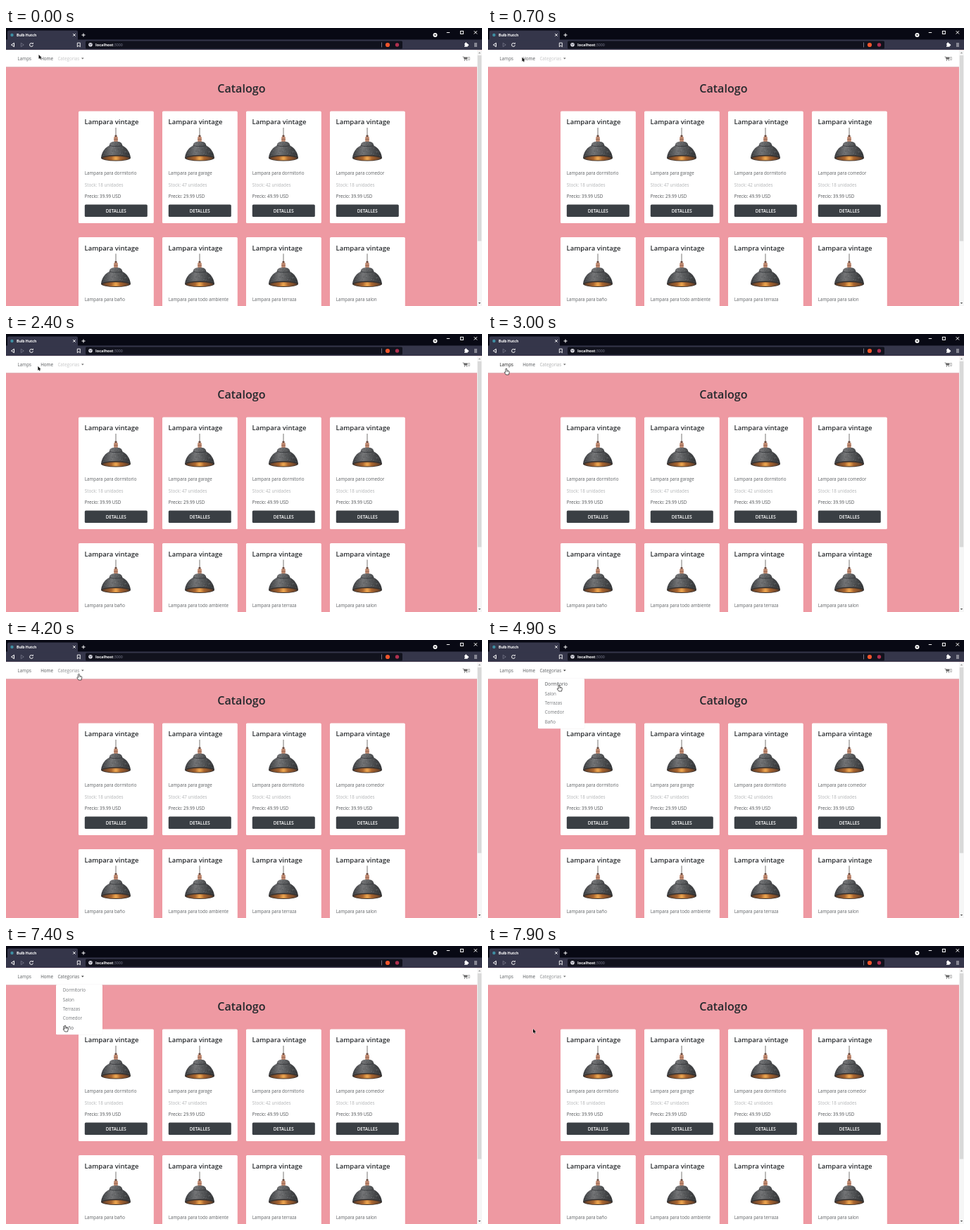
These frames come from a looping animation (676 px wide and 396 px high, 8 s). An HTML page with a canvas:

```html
<!DOCTYPE html>
<html lang="es">
<head>
<meta charset="utf-8">
<title>Bulb Hutch</title>
<style>
  html, body { margin: 0; width: 100%; height: 100%; overflow: hidden; background: #ee99a2; }
  canvas { display: block; width: 676px; height: 396px; }
</style>
</head>
<body>
<canvas id="stage"></canvas>
<script>
const W = 676, H = 396, LOOP = 8000;
const canvas = document.getElementById('stage');
const ratio = window.devicePixelRatio || 1;
canvas.width = W * ratio;
canvas.height = H * ratio;
const screen = canvas.getContext('2d');
let c = screen;

const FONT = '"Open Sans", "Noto Sans", sans-serif';
const BODY = 6.25;

const products = [
  ['Lampara vintage', 'dormitorio', 18, '39.99'],
  ['Lampara vintage', 'garage', 47, '29.99'],
  ['Lampara vintage', 'dormitorio', 42, '49.99'],
  ['Lampara vintage', 'comedor', 18, '39.99'],
  ['Lampara vintage', 'baño', 20, '29.99'],
  ['Lampara vintage', 'todo ambiente', 25, '39.99'],
  ['Lampra vintage', 'terraza', 30, '49.99'],
  ['Lampara vintage', 'salon', 15, '39.99']
];
const categories = ['Dormitorio', 'Salon', 'Terrazas', 'Comedor', 'Baño'];

// Pointer path: time, x, y
const path = [
  [0, 46.5, 38], [500, 46, 41], [1000, 52, 43], [1500, 78.5, 41.5], [1800, 82, 44],
  [2700, 27, 47], [3000, 26, 49], [3600, 25, 49], [3700, 57, 47], [3900, 57, 47],
  [4200, 103.5, 48], [4400, 103.5, 48], [4900, 101, 64], [5200, 101, 64],
  [5300, 101, 67], [6000, 101, 67], [6500, 88, 79.5], [7000, 87, 98],
  [7400, 84, 113], [7700, 58, 116], [7900, 64, 118]
];

function rect(x, y, w, h, fill, r = 0) {
  c.fillStyle = fill;
  c.beginPath();
  c.roundRect(x, y, w, h, r);
  c.fill();
}

function dot(x, y, r, fill) {
  c.fillStyle = fill;
  c.beginPath();
  c.arc(x, y, r, 0, Math.PI * 2);
  c.fill();
}

function trace(points) {
  c.beginPath();
  for (let i = 0; i < points.length; i += 2) c.lineTo(points[i], points[i + 1]);
}

function poly(points, fill) {
  trace(points);
  c.closePath();
  c.fillStyle = fill;
  c.fill();
}

function line(points, stroke, width = 0.8) {
  trace(points);
  c.strokeStyle = stroke;
  c.lineWidth = width;
  c.stroke();
}

function text(str, x, y, size, color, weight = 400, align = 'left') {
  c.font = `${weight} ${size}px ${FONT}`;
  c.textAlign = align;
  c.fillStyle = color;
  c.fillText(str, x, y);
}

function seeded(seed) {
  return () => (seed = (seed * 16807) % 2147483647) / 2147483647;
}

function browser() {
  rect(0, 0, W, 17, '#080914');
  rect(0, 16.5, W, 15, '#35364a');
  rect(2, 3.5, 100, 14, '#35364a', [2, 2, 0, 0]);
  dot(8.5, 10, 2.2, '#3f8fa3');
  text('Bulb Hutch', 15, 11.8, 5.1, '#fff', 700);
  line([95.2, 8.2, 98.6, 11.6], '#fff', 1);
  line([98.6, 8.2, 95.2, 11.6], '#fff', 1);
  line([107.5, 10, 112.5, 10], '#fff', 1);
  line([110, 7.5, 110, 12.5], '#fff', 1);

  dot(609.5, 10, 3, '#fff');
  poly([608, 9.3, 611, 9.3, 609.5, 11.4], '#111');
  line([625.8, 6.5, 630.2, 6.5], '#fff', 1);
  c.strokeRect(645.4, 4.4, 4, 4);
  line([664.7, 4.2, 669, 8.5], '#fff', 1);
  line([669, 4.2, 664.7, 8.5], '#fff', 1);

  line([11.5, 21.3, 7.5, 24, 11.5, 26.7, 11.5, 21.3], '#fff', 1);
  line([21.3, 21.3, 25.3, 24, 21.3, 26.7, 21.3, 21.3], '#77798a');
  c.beginPath();
  c.arc(36, 24, 2.4, 0.2, 5.4);
  c.strokeStyle = '#fff';
  c.lineWidth = 1;
  c.stroke();
  poly([36.5, 22.8, 38.8, 22.8, 38.8, 20.6], '#fff');
  line([101.3, 21.2, 105.3, 21.2, 105.3, 26.8, 103.3, 25, 101.3, 26.8, 101.3, 21.2], '#fff', 0.9);

  rect(113, 18.5, 450, 11, '#11121d', 1.5);
  dot(120, 23.8, 2.8, '#e4e4ea');
  line([118, 22.8, 120.3, 23.6, 119.6, 25.4], '#55566a', 0.8);
  line([120.7, 21.8, 122, 23.8], '#55566a', 0.7);
  text('localhost', 127, 25.9, 5.6, '#fff', 700);
  const end = 127 + c.measureText('localhost').width;
  text(':3000', end, 25.9, 5.2, '#85879a');
  rect(533, 20.5, 0.8, 7, '#8a8b9a');
  dot(542, 24, 3.1, '#f0552c');
  dot(555.5, 24, 2.7, '#b0304f');

  rect(651, 22, 4.7, 4.7, '#fff', 0.5);
  dot(653.2, 21.8, 1.2, '#fff');
  dot(655.9, 24.3, 1.2, '#fff');
  dot(651.1, 24.4, 0.8, '#35364a');
  for (let y = 22; y < 27; y += 2) line([665, y, 669, y], '#fff', 0.8);
}

function lamp(x, y) {
  c.save();
  c.translate(x, y);
  line([0, 0, 0, 11], '#55514f', 0.8);
  rect(-1.5, 10.5, 3, 4, '#6b4a3f', 0.8);
  rect(-2.8, 13, 5.6, 7.5, '#c08a70', 0.8);
  rect(-2.8, 16.3, 5.6, 0.8, '#8a5947');

  // Shade: a rounded cap that steps out into a wide bell
  c.beginPath();
  c.moveTo(-9.3, 25.5);
  c.bezierCurveTo(-9, 21, -6, 19.8, 0, 19.8);
  c.bezierCurveTo(6, 19.8, 9, 21, 9.3, 25.5);
  c.bezierCurveTo(15.5, 28.5, 20, 34.5, 21, 42.8);
  c.quadraticCurveTo(0, 51, -21, 42.8);
  c.bezierCurveTo(-20, 34.5, -15.5, 28.5, -9.3, 25.5);
  c.closePath();
  const metal = c.createLinearGradient(-21, 0, 21, 0);
  metal.addColorStop(0, '#37393c');
  metal.addColorStop(0.36, '#737476');
  metal.addColorStop(0.65, '#515355');
  metal.addColorStop(1, '#303234');
  c.fillStyle = metal;
  c.fill();
  c.save();
  c.clip();
  const rnd = seeded(71);
  for (let i = 0; i < 150; i++) {
    const shade = rnd() < 0.5 ? 'rgba(20,22,24,.35)' : 'rgba(170,172,174,.3)';
    rect(rnd() * 43 - 21.5, 20 + rnd() * 25, 0.9, 0.8, shade);
  }
  c.restore();
  line([-9.3, 25.5, -4, 26.5, 4, 26.5, 9.3, 25.5], '#303235', 0.7);

  c.beginPath();
  c.ellipse(0, 43.2, 21, 4.2, 0, 0, Math.PI * 2);
  c.fillStyle = '#37312e';
  c.fill();
  const glow = c.createRadialGradient(0, 44, 1, 0, 44, 19);
  glow.addColorStop(0, '#eaa44f');
  glow.addColorStop(0.3, '#a9652f');
  glow.addColorStop(1, '#5d3d2a');
  c.beginPath();
  c.ellipse(0, 43.6, 19, 3, 0, 0, Math.PI * 2);
  c.fillStyle = glow;
  c.fill();
  c.restore();
}

function card([name, room, stock, price], i) {
  c.save();
  c.translate(103 + (i % 4) * 119, 118.5 + Math.floor(i / 4) * 179.5);
  rect(0, 0, 106.8, 159.5, '#fff', 1.6);
  text(name, 8.6, 18.7, 9.5, '#25282b', 600);
  lamp(53, 23.5);
  text('Lampara para ' + room, 8.8, 90.6, BODY, '#5d6063');
  text(`Stock: ${stock} unidades`, 8.8, 107.2, BODY, '#b2b4b6');
  text(`Precio: ${price} USD`, 8.8, 123.9, BODY, '#4d5053');
  rect(8.8, 133, 89, 17.6, '#3a3f44', 1.6);
  text('DETALLES', 53.2, 144.2, BODY, '#fff', 600, 'center');
  c.restore();
}

function page() {
  rect(0, 31, W, H, '#ee99a2');
  rect(0, 55, 669, 1.2, '#dc9ea6');
  rect(0, 31.3, 669, 23.9, '#fff');
  text('Catalogo', 334.4, 91.8, 16.1, '#25292d', 600, 'center');
  products.forEach(card);

  line([648.5, 41, 650, 41, 651, 44.6, 655, 44.6], '#666', 0.7);
  poly([650, 41.4, 655.7, 41.4, 655, 43.9, 650.7, 43.9], '#666');
  dot(651.4, 46, 0.7, '#666');
  dot(654.5, 46, 0.7, '#666');
  text('0', 655.8, 45.8, BODY, '#777');

  rect(669, 31.3, 7, H, '#f6f6f6');
  rect(669.8, 39, 5.4, 264.5, '#d9d9d9');
  poly([670.8, 36.2, 674.2, 36.2, 672.5, 34.2], '#999');
  poly([670.8, 391, 674.2, 391, 672.5, 393], '#555');
}

// The unchanging part is drawn once.
const still = document.createElement('canvas');
still.width = canvas.width;
still.height = canvas.height;
c = still.getContext('2d');
c.scale(ratio, ratio);
browser();
page();
c = screen;
c.scale(ratio, ratio);

function pointerAt(t) {
  const n = path.findIndex(p => p[0] > t);
  if (n < 0) return path[path.length - 1].slice(1);
  const [t0, x0, y0] = path[n - 1], [t1, x1, y1] = path[n];
  const k = (t - t0) / (t1 - t0);
  return [x0 + (x1 - x0) * k, y0 + (y1 - y0) * k];
}

function nav(t, x, open) {
  const overBrand = t >= 2500 && x < 38 && t < 3700;
  text('Lamps', 16.6, 45.8, BODY, overBrand ? '#222' : '#606366');
  text('Home', 49.2, 45.8, BODY, '#505356');
  const tone = open ? '#606366' : t < 2500 ? '#c6c7c8' : t < 4000 ? '#b0b1b2' : '#8c8e90';
  text('Categorias', 73.4, 45.8, BODY, tone);
  poly([107, 42.6, 110.6, 42.6, 108.8, 44.5], open ? '#333' : '#666');
}

function menu(x, y) {
  rect(70.8, 54.8, 66.4, 71.7, 'rgba(90,60,65,.12)', 1.6);
  rect(71, 55, 66, 71.3, '#fff', 1.4);
  const active = x > 71 ? Math.floor((y - 56.3) / 13.4) : -1;
  categories.forEach((name, i) => {
    text(name, 80.8, 65.3 + i * 13.35, BODY, i === active ? '#505356' : '#75787b');
  });
}

function arrow(x, y) {
  c.save();
  c.translate(x, y);
  const shape = [0, 0, 0, 6, 1.4, 4.8, 2.3, 6.8, 3.3, 6.3, 2.4, 4.4, 4.2, 4.3];
  line([...shape, 0, 0], '#fff', 0.8);
  poly(shape, '#111');
  c.restore();
}

function hand(x, y) {
  c.save();
  c.translate(x, y);
  c.beginPath();
  c.moveTo(-1, 5.5);
  c.lineTo(-1, 0.8);
  c.quadraticCurveTo(0, -0.8, 0.9, 0.8);
  c.lineTo(0.9, 3.2);
  c.lineTo(3.5, 3.8);
  c.quadraticCurveTo(4.5, 4, 4.3, 5.5);
  c.lineTo(3.5, 9);
  c.lineTo(-0.5, 9);
  c.lineTo(-2.8, 5.7);
  c.quadraticCurveTo(-2.2, 4.4, -1, 5.5);
  c.closePath();
  c.fillStyle = '#fff';
  c.fill();
  c.strokeStyle = '#222';
  c.lineWidth = 0.75;
  c.stroke();
  line([0.9, 3.4, 0.9, 5.2], '#444', 0.5);
  line([2.3, 3.8, 2.3, 5.4], '#444', 0.5);
  c.restore();
}

function draw(now) {
  const t = Math.floor((now % LOOP) / 100) * 100;
  const [x, y] = pointerAt(t);
  const open = t >= 4400 && t < 7900;
  c.drawImage(still, 0, 0, W, H);
  nav(t, x, open);
  if (open) menu(x, y);
  const linked = t >= 2500 && t < 7500;
  (linked ? hand : arrow)(x, y);
}

let start;
function tick(now) {
  start ??= now;
  draw(now - start);
  requestAnimationFrame(tick);
}
draw(0);
requestAnimationFrame(tick);
</script>
</body>
</html>
```
